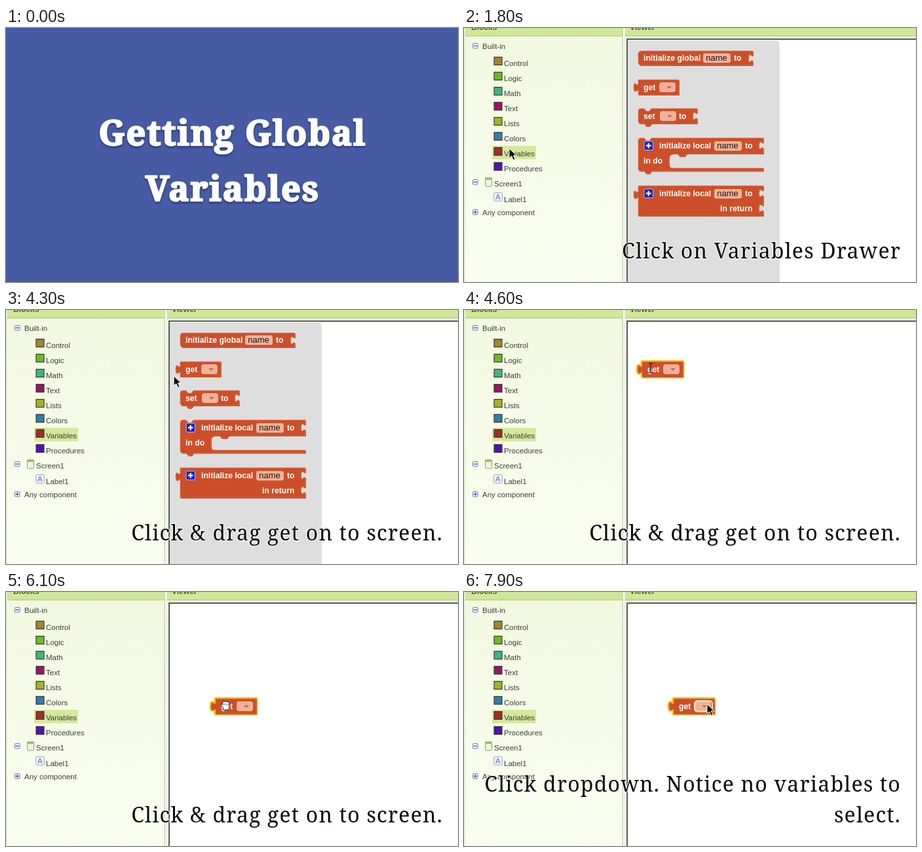
Recreate the animation shown at these times as an HTML page. Size 690 by 388 pixels, loop 8000 ms.

```html
<!DOCTYPE html>
<html lang="en">
<head>
<meta charset="utf-8">
<title>Getting Global Variables</title>
<style>
  html, body { margin: 0; width: 100%; height: 100%; overflow: hidden; background: #fff; }
  svg { display: block; width: 100vw; height: 100vh; }
  text { white-space: pre; }
  .title { font: 700 52px "Noto Serif", serif; fill: #fff; stroke: #fff; stroke-width: 2.4;
    stroke-linejoin: round; text-anchor: middle; letter-spacing: 2px;
    filter: drop-shadow(0 2px 1.5px rgba(0, 0, 30, .45)); }
  .tree { font: 11.5px "Liberation Sans", Arial, sans-serif; fill: #3c3f38; }
  .head { font: 700 12px "Liberation Sans", Arial, sans-serif; fill: #4c5a2a; }
  .block { font: 700 12.2px "Liberation Sans", Arial, sans-serif; fill: #fff; }
  .field { font: 13px "Liberation Sans", Arial, sans-serif; fill: #1c1210; }
  .caption { font: 300 32px "Noto Serif", serif; fill: #080808; text-anchor: end; letter-spacing: 1.2px;
    stroke: #fff; stroke-width: 2.4; stroke-opacity: .8; stroke-linejoin: round; paint-order: stroke; }
</style>
</head>
<body>
<svg id="stage" viewBox="0 0 690 388" preserveAspectRatio="none"></svg>
<script>
const LOOP = 8000;
const RED = '#cd4f29', PINK = '#f0b29b';
const BUMP = 'h-3 l-3 4 h-5 l-3 -4';
const SOCKET = 'v4.5 c0 9 -7 -7 -7 6.5 s7 -2.5 7 6.5';
const PLUG = 'v-4 c0 -9 -7 7 -7 -6.5 s7 2.5 7 -6.5';

const rect = (x, y, w, h, fill, extra = '') =>
  `<rect x="${x}" y="${y}" width="${w}" height="${h}" fill="${fill}" ${extra}/>`;
const text = (cls, x, y, s) => `<text class="${cls}" x="${x}" y="${y}">${s}</text>`;
const path = (d, extra) => `<path d="${d}" ${extra}/>`;
const group = (id, inner) => `<g id="${id}">${inner}</g>`;

// Left-hand component tree
function toggle(y, plus) {
  return rect(13.5, y + .5, 7.5, 7.5, '#f2f4ff', 'rx="1" stroke="#7274bd"') +
    path(`M15 ${y + 4.3}h4.6` + (plus ? `M17.3 ${y + 2}v4.6` : ''), 'stroke="#3034a0" stroke-width="1.2"');
}
function tree() {
  const rows = [['Control', '#a3852c'], ['Logic', '#6cbb22'], ['Math', '#3fb67c'], ['Text', '#9b1469'],
    ['Lists', '#a0b526'], ['Colors', '#337cab'], ['Variables', '#a12d2d'], ['Procedures', '#5410b8']];
  const items = rows.map(([name, color], i) =>
    rect(46, 44.5 + 23 * i, 12, 12, color, 'stroke="#333a30" stroke-width="1.2"') +
    text('tree', 61, 57.5 + 23 * i, name)).join('');
  return rect(43, 180, 67, 20.5, '#d5e89d') + items +
    toggle(23) + text('tree', 28, 32, 'Built-in') +
    toggle(231) + rect(32.5, 229, 10, 13, '#eef4df', 'rx="1.5" stroke="#929c80"') +
    rect(32, 228.5, 11, 3.5, '#9dbd61') + text('tree', 46, 242, 'Screen1') +
    rect(45.5, 251.5, 13, 13, '#eef1f8', 'rx="2" stroke="#a6abb8"') +
    `<text class="tree" x="48" y="262" style="fill:#5874b9">A</text>` +
    text('tree', 61, 265.5, 'Label1') +
    toggle(277, true) + text('tree', 28, 286, 'Any component');
}
function editor() {
  return rect(0, 0, 690, 388, '#f8fceb') + rect(2, 13, 240, 375, 'url(#panel)') +
    rect(0, 0, 2, 388, '#e7eed8') +
    rect(2, 0, 240, 12, '#d1e798') + rect(246, 0, 444, 12, '#d1e798') +
    rect(2, 11.5, 240, 1.3, '#b4ca80') + rect(246, 11.5, 444, 1.3, '#b4ca80') +
    text('head', 11, 3, 'Blocks') + text('head', 253, 3, 'Viewer') +
    rect(241.5, 0, 1.5, 388, '#cbd2bd') + rect(243, 0, 2.5, 388, '#fbfdf6') + rect(245.3, 0, 1, 388, '#d8dfca') +
    rect(249, 17, 450, 380, '#fff', 'stroke="#565856" stroke-width="2"') + tree();
}

// Blocks
const body = d => path(d, `fill="#9c3b20" transform="translate(.8 1)"`) +
  path(d, `fill="${RED}" stroke="#df7957" stroke-width=".7"`);
const nameField = (x, y) => rect(x, y, 42, 14.5, PINK, 'rx="3"') + text('field', x + 4.3, y + 11, 'name');
const dropdown = (x, y) => rect(x, y, 25, 15, PINK, 'rx="4"') +
  path(`M${x + 11} ${y + 6}h8l-4 4z`, 'fill="#c66d4e"');
const plusIcon = y => rect(275, y, 13.5, 13.5, '#1d22c4', 'rx="2" stroke="#bcbcf5" stroke-width="1"') +
  path(`M278 ${y + 6.7}h7.5m-3.75 -3.75v7.5`, 'stroke="#fff" stroke-width="2.2"');
const GET = `M266 79H328V102H266v-1${PLUG}z`;
const getBlock = () => body(GET) + text('block', 274, 94.5, 'get') + dropdown(298, 83);
const localLine = y => plusIcon(y) + text('block', 298, y + 11, 'initialize local') +
  nameField(382, y) + text('block', 429, y + 11, 'to');

function drawer() {
  const local = `M270 168h5l3 4h5l3 -4H457${SOCKET}V192H340l-3 4h-8l-3 -4h-7q-6 0 -6 6v10q0 6 6 6H457v4.5H289${BUMP}H270q-4 0 -4 -4V172q0 -4 4 -4z`;
  return path('M250 19H475q7 0 7 7V388H250z', 'fill="#dedede"') +
    body(`M271 35H441${SOCKET}V57H271q-5 0 -5 -5V40q0 -5 5 -5z`) +
    text('block', 274, 50, 'initialize global') + nameField(365, 38.7) + text('block', 412, 50, 'to') +
    getBlock() +
    body(`M270 123h5l3 4h5l3 -4H356${SOCKET}V146H289${BUMP}H270q-4 0 -4 -4V127q0 -4 4 -4z`) +
    text('block', 274, 139, 'set') + dropdown(299, 127) + text('block', 328, 139, 'to') +
    body(local) + localLine(173) + text('block', 274, 207, 'in do') +
    body(`M266 241H457${SOCKET}V264${SOCKET}V287H266V265${PLUG}z`) +
    localLine(246) + text('block', 391, 280, 'in return');
}
const dragged = () => path(GET, 'fill="none" stroke="#fbc71b" stroke-width="5" stroke-linejoin="round"') +
  getBlock() + `<rect id="focus" x="298" y="82.5" width="27" height="16" rx="4" fill="none" stroke="#fff1e6" stroke-width="1.8"/>`;

// Each pointer has its hot spot at 0,0
const pointers = {
  arrow: path('M0 0V15l3.6 -3.3 2.7 6 2.7 -1.2 -2.6 -5.7H11z', 'fill="#0a0a0a" stroke="#fff" stroke-width="1"'),
  beam: path('M-3 -7q3 0 3 2V6q0 2 -3 2M3 -7q-3 0 -3 2M3 8q-3 0 -3 -2M-2 1h4', 'fill="none" stroke="#222" stroke-width="1.2"'),
  hand: path('M-5 1q-3 -4 0 -4l1 1q-2 -5 1 -4 1 -2 3 0 2 -2 3 0 3 -1 3 2v4q0 4 -2 6h-6z', 'fill="#fff" stroke="#222" stroke-width="1"') +
    path('M-2 -4v3M1 -4v3M4 -3v3', 'stroke="#222" stroke-width=".8"')
};

document.getElementById('stage').innerHTML =
  `<defs><linearGradient id="panel" x1="0" y1="0" x2="0" y2="1">
    <stop stop-color="#f2f9e0"/><stop offset="1" stop-color="#f9fdf0"/></linearGradient></defs>` +
  group('editor', editor() + group('drawer', drawer()) + group('dragged', dragged()) +
    group('pointer', Object.entries(pointers).map(([id, art]) => group(id, art)).join('')) +
    group('caption1', text('caption', 667, 352, 'Click on Variables Drawer')) +
    group('caption2', text('caption', 667, 352, 'Click &amp; drag get on to screen.')) +
    group('caption3', text('caption', 667, 305, 'Click dropdown. Notice no variables to') +
      text('caption', 667, 352, 'select.'))) +
  group('intro', rect(0, 0, 690, 388, '#465ba4') +
    text('title', 346, 178.5, 'Getting Global') + text('title', 346, 263.5, 'Variables'));

const el = id => document.getElementById(id);
const show = (id, on) => el(id).setAttribute('display', on ? 'inline' : 'none');
const move = (id, x, y) => el(id).setAttribute('transform', `translate(${x} ${y})`);
const mix = (a, b, p) => a + (b - a) * p;
function ease(t, start, end) {
  const p = Math.min(1, Math.max(0, (t - start) / (end - start)));
  return p * p * (3 - 2 * p);
}

function render(t) {
  const reach = ease(t, 3800, 4450);
  const drag = ease(t, 4600, 5500);
  const aim = ease(t, 7250, 7880);
  const kind = t < 4450 || t >= 7250 ? 'arrow' : t < 4650 ? 'beam' : 'hand';

  show('intro', t < 1800);
  show('editor', t >= 1800);
  show('drawer', t < 4550);
  show('dragged', t >= 4550);
  show('focus', t >= 7850);
  show('caption1', t < 3800);
  show('caption2', t >= 3800 && t < 6300);
  show('caption3', t >= 6300);
  for (const id in pointers) show(id, id === kind);

  move('dragged', mix(6, 54, drag), mix(0, 84, drag));
  const x = mix(mix(mix(69, 285, reach), 335, drag), 371, aim);
  const y = mix(mix(mix(184, 88, reach), 174, drag), 171, aim) + 12 * Math.sin(Math.PI * aim);
  move('pointer', x, y);
}

function frame() {
  render(performance.now() % LOOP);
  requestAnimationFrame(frame);
}
frame();
</script>
</body>
</html>
```
